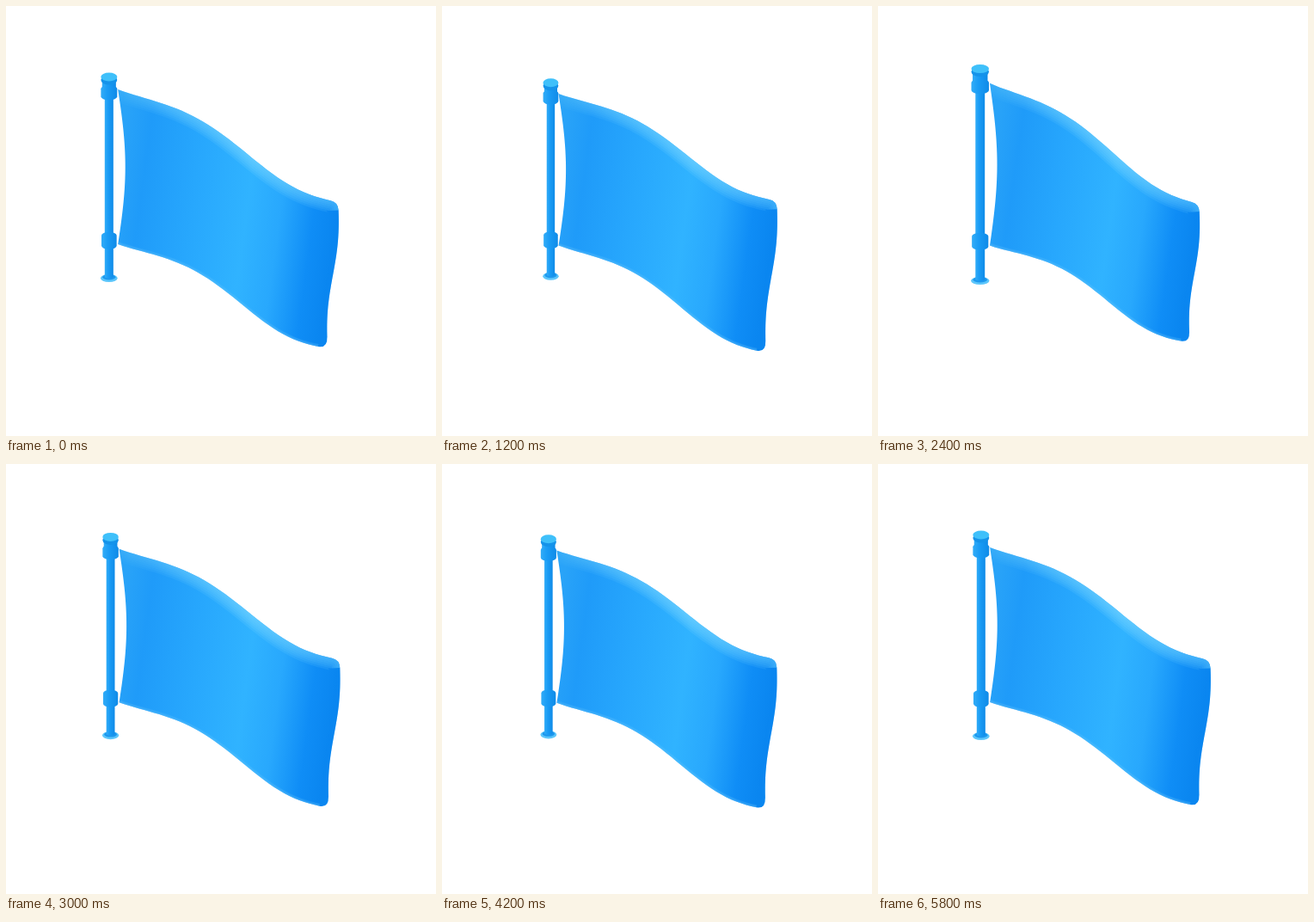
Write an HTML page with a canvas that moves like this. It is 500x500 px and loops after 6000 ms.

```html
<!DOCTYPE html>
<html lang="en">
<head>
<meta charset="utf-8">
<title>Waving flag</title>
<style>
  html, body { margin: 0; width: 100%; height: 100%; overflow: hidden; background: #fff; }
  canvas { display: block; width: 500px; height: 500px; }
</style>
</head>
<body>
<canvas id="stage" width="500" height="500"></canvas>
<script>
const ctx = document.getElementById('stage').getContext('2d');
const LOOP = 6000, STEP = 200, SWING = 2900, PEAK = 750;
const { PI, sin, cos } = Math;

const mix = (a, b, t) => a + (b - a) * t;
const point = (x, y) => ({ x, y });

// Flag corners for swing s in -1..1
function corners(s) {
  const left = 130.5 + 5.8 * s + 5.8 * s * s;
  return {
    tl: point(left, 97.4 + 8.3 * s),
    tr: point(386.8 + 8.5 * s - 7 * s * s, 228 - 2.5 * s),
    br: point(374.3 + 7.5 * s - 6 * s * s, 398.5 + 8 * s),
    bl: point(left, 277 + s + 3 * s * s)
  };
}

// Long edge: a straight line with one skewed wave
function wave(a, b, u) {
  const lift = 11 * sin(2 * PI * u ** 1.25) + 3 * sin(PI * u);
  return point(mix(a.x, b.x, u), mix(a.y, b.y, u) - lift);
}

// Side edge: a straight line pushed sideways by bend(v)
const side = (a, b, v, bend) => point(mix(a.x, b.x, v) + bend(v), mix(a.y, b.y, v));

// Sample an edge function between two parameters
function sample(edge, from, to, n = 40) {
  return Array.from({ length: n + 1 }, (_, i) => edge(mix(from, to, i / n)));
}

function trace(pts, path = new Path2D(), joined = false) {
  pts.forEach((p, i) => i || joined ? path.lineTo(p.x, p.y) : path.moveTo(p.x, p.y));
  return path;
}

function flagShape(s) {
  const { tl, tr, br, bl } = corners(s);
  const top = sample(u => wave(tl, tr, u), 0, 0.965);
  const right = sample(v => side(tr, br, v, w => 3 * sin(2 * PI * w)), 0.055, 0.925);
  const low = sample(u => wave(bl, br, u), 0.955, 0);
  const left = sample(v => side(bl, tl, v, w => 8.5 * sin(PI * w)), 0, 1);
  const outline = trace(top);
  outline.quadraticCurveTo(tr.x, tr.y, right[0].x, right[0].y);
  trace(right, outline, true);
  outline.quadraticCurveTo(br.x, br.y, low[0].x, low[0].y);
  trace(low, outline, true);
  trace(left, outline, true);
  outline.closePath();

  const rim = trace(top);
  rim.quadraticCurveTo(tr.x, tr.y, right[0].x, right[0].y);
  return { outline, rim, low: trace(low), right: trace(right), x0: tl.x, x1: tr.x };
}

function gradient(x0, y0, x1, y1, stops) {
  const g = ctx.createLinearGradient(x0, y0, x1, y1);
  stops.forEach(([at, color]) => g.addColorStop(at, color));
  return g;
}

// Stacked strokes that fade inwards from an edge
function glow(path, color, width, layers) {
  ctx.strokeStyle = color;
  for (let i = 1; i <= layers; i++) {
    ctx.lineWidth = width * i / layers;
    ctx.stroke(path);
  }
}

function drawFlag(s) {
  const f = flagShape(s);
  ctx.save();
  ctx.clip(f.outline);
  ctx.fillStyle = gradient(f.x0, 190, f.x1, 225, [
    [0, '#29a3f8'], [0.12, '#1f9bf9'], [0.35, '#27a7fd'], [0.6, '#30b3ff'],
    [0.75, '#28a8fd'], [0.9, '#0f8df6'], [1, '#0a86f0']
  ]);
  ctx.fillRect(0, 0, 500, 500);
  ctx.lineJoin = 'round';
  const shine = gradient(f.x0, 0, f.x1, 0, [
    [0, 'rgba(100,200,255,0.04)'], [0.3, 'rgba(100,200,255,0.16)'],
    [0.6, 'rgba(110,208,255,0.2)'], [1, 'rgba(90,195,255,0.14)']
  ]);
  glow(f.rim, shine, 28, 6);
  glow(f.right, 'rgba(10,128,235,0.12)', 12, 3);
  glow(f.low, 'rgba(100,195,250,0.18)', 6, 3);
  ctx.restore();
}

function ellipse(x, y, rx, ry, fill) {
  ctx.beginPath();
  ctx.ellipse(x, y, rx, ry, 0, 0, PI * 2);
  ctx.fillStyle = fill;
  ctx.fill();
}

// Upright cylinder with bowed ends
function tube(x, top, bottom, r, bow) {
  ctx.beginPath();
  ctx.ellipse(x, top + bow, r, bow, 0, PI, 0);
  ctx.ellipse(x, bottom - bow, r, bow, 0, 0, PI);
  ctx.closePath();
  ctx.fillStyle = gradient(x - r, 0, x + r, 0,
    [[0, '#32acf7'], [0.4, '#1a9cf5'], [1, '#108be8']]);
  ctx.fill();
}

function drawPole(s) {
  const x = 120.2 + 7.5 * s + 6.5 * s * s;
  const cap = 84.6 + 11 * s, high = 101.3 + 8.5 * s;
  const low = 272.8 - s, base = 316.2 - 3.6 * s;
  const k = 1 - 0.1 * s;
  ellipse(x, base, 9.8 * k, 4.6, '#5cc6fb');
  ellipse(x, base - 1.2, 7.5 * k, 3.2, '#1d98ee');
  tube(x, high, base, 5 * k, 2);
  tube(x, low - 10, low + 10, 8.8 * k, 4);
  tube(x, cap, high, 8 * k, 3);
  tube(x, high - 8.5, high + 8.5, 9.4 * k, 4);
  ellipse(x, cap + 2, 9.4 * k, 5.5, '#1593ea');
  ellipse(x, cap - 1.5, 9.4 * k, 5, '#3fc0fa');
}

function draw(now) {
  const t = Math.floor((now % LOOP) / STEP) * STEP;
  const s = cos((t - PEAK) / SWING * PI * 2);
  ctx.fillStyle = '#fff';
  ctx.fillRect(0, 0, 500, 500);
  drawFlag(s);
  drawPole(s);
}

const start = performance.now();
function tick() {
  draw(performance.now() - start);
  requestAnimationFrame(tick);
}
tick();
</script>
</body>
</html>
```
